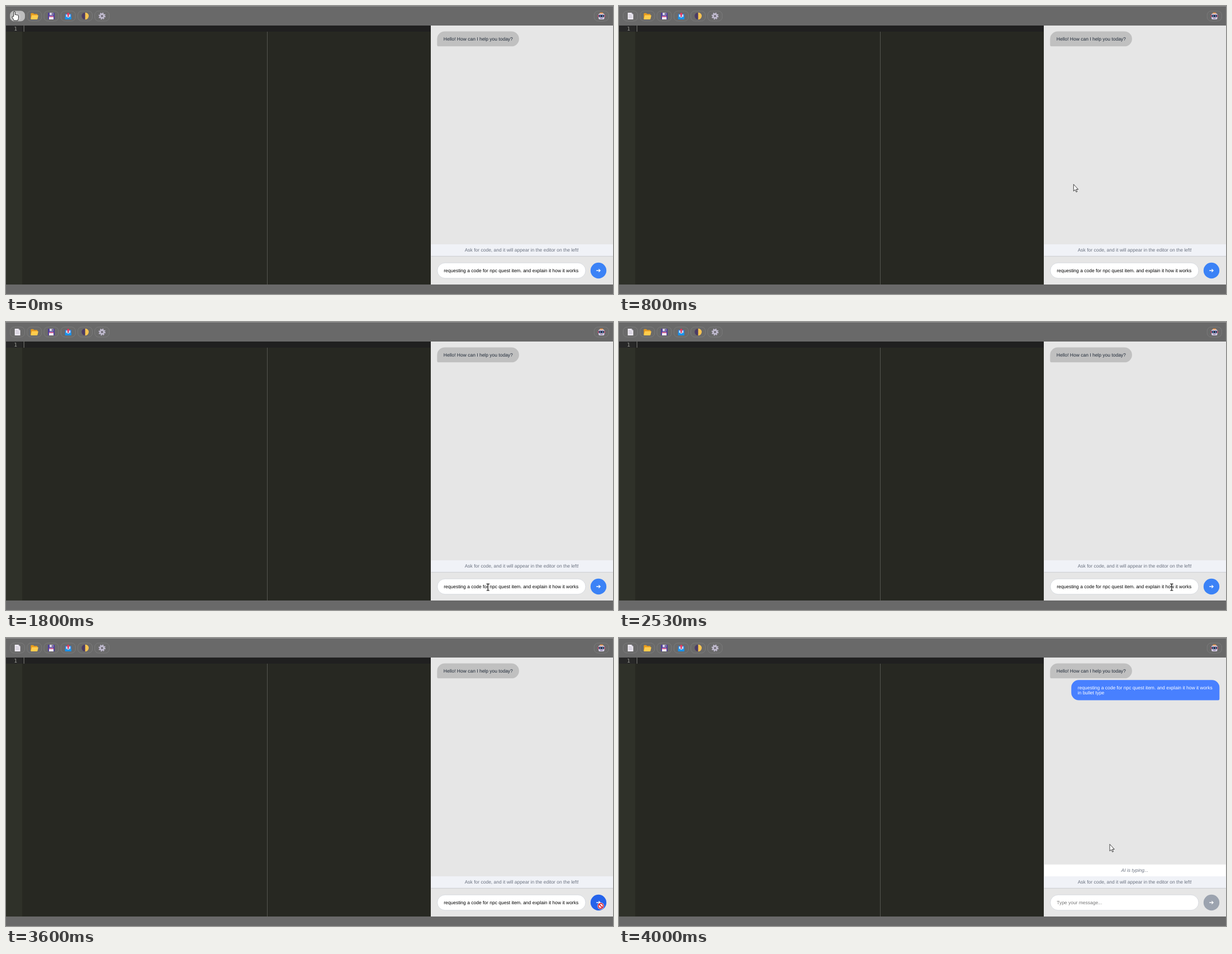
Recreate the animation shown at these times as an HTML page. Size 1086 px wide and 516 px high, loop 8000 ms.

```html
<!DOCTYPE html>
<html lang="en">
<head>
<meta charset="utf-8">
<title>Code editor with chat</title>
<style>
html, body { margin: 0; width: 100%; height: 100%; overflow: hidden; background: #696969; }
svg { display: block; width: 100vw; height: 100vh; }
text { font: 8.49px "Liberation Sans", Arial, sans-serif; text-rendering: geometricPrecision; }
.mid { text-anchor: middle; fill: #6b7280; }
.tool { fill: #6a6a6a; stroke: #7f7f7f; stroke-width: .8; }
</style>
</head>
<body>
<svg viewBox="0 0 1086 516">
  <rect width="1086" height="516" fill="#696969"/>
  <rect width="1086" height="1" fill="#8e8e8e"/>

  <!-- toolbar -->
  <g id="tools"></g>
  <g id="pageIcon" transform="translate(20.5 18)">
    <path d="M-4.8-6H2L5-3V6H-4.8Z" fill="#f1eef5"/>
    <path d="M2-6V-3H5Z" fill="#b9b3c6"/>
    <path d="M-3-3H.5M-3-1H3M-3 1H3M-3 3H3" stroke="#b5afc2" stroke-width=".8"/>
  </g>
  <g transform="translate(50.8 18)">
    <path d="M-6.5-4.3Q-6.5-5.3-5.5-5.3H-2L-.5-3.7H4.5Q5.5-3.7 5.5-2.7V5H-6.5Z" fill="#e79a1c"/>
    <path d="M-4.5-1.4H6.2Q7.2-1.4 6.9-.4L5.5 5Q5.3 6 4.3 6H-5.5Q-6.7 6-6.5 4.8Z" fill="#ffcc4d"/>
  </g>
  <g transform="translate(81 18)">
    <path d="M-6-5Q-6-6-5-6H5L6-5V5Q6 6 5 6H-5Q-6 6-6 5Z" fill="#50409a"/>
    <rect x="-3" y="-6" width="6.4" height="4.6" fill="#d5d0e4"/>
    <rect x="1" y="-5.4" width="1.5" height="3.3" fill="#433b6b"/>
    <rect x="-4" y=".4" width="8" height="5.6" fill="#f3eef8"/>
    <rect x="-4" y=".4" width="8" height="1.4" fill="#e54a7b"/>
  </g>
  <g transform="translate(111.3 18)">
    <rect x="-5.6" y="-4" width="11.2" height="10" rx="1.2" fill="#2a7bd6"/>
    <rect x="-4" y="-2.8" width="8" height="5.6" fill="#bfe2fb"/>
    <path d="M-5.6 1.6H-2L-1 3.2H1L2 1.6H5.6V6H-5.6Z" fill="#1792ec"/>
    <path d="M0-6.4L3.2-2.8H1.2V1.4H-1.2V-2.8H-3.2Z" fill="#e8365c"/>
  </g>
  <g transform="translate(141.6 18)">
    <circle r="6.2" fill="#4b3c66"/>
    <path d="M0-6.2A6.2 6.2 0 0 1 0 6.2Q2-0 0-6.2Z" fill="#fcc95a"/>
    <path d="M0-6.2A6.2 6.2 0 0 1 0 6.2Z" fill="#f6c451"/>
  </g>
  <g transform="translate(171.8 18)">
    <circle r="5.3" fill="none" stroke="#c3bdd2" stroke-width="2" stroke-dasharray="2.08 2.08"/>
    <circle r="3.4" fill="none" stroke="#c3bdd2" stroke-width="2.6"/>
    <circle r="1.6" fill="#77717f"/>
  </g>
  <g transform="translate(1065.3 18)">
    <rect x="-3" y="-6.2" width="6" height="3" rx="1" fill="#f1933c"/>
    <rect x="-6.3" y="-2" width="12.6" height="4" rx="1" fill="#e5446d"/>
    <rect x="-5.2" y="-4.4" width="10.4" height="10.4" rx="2" fill="#d8d0e6"/>
    <rect x="-5" y="-2.2" width="10" height="4.2" rx="1.4" fill="#2d2548"/>
    <circle cx="-2.3" r="1.1" fill="#63d4f5"/>
    <circle cx="2.3" r="1.1" fill="#63d4f5"/>
    <rect x="-2.4" y="3.4" width="4.8" height="1.1" fill="#6b5a8e"/>
  </g>

  <!-- editor -->
  <rect y="35" width="760" height="464" fill="#272822"/>
  <rect y="35" width="29" height="464" fill="#2f3129"/>
  <rect y="35" width="29" height="11" fill="#272727"/>
  <rect x="29" y="35" width="731" height="11" fill="#202020"/>
  <rect x="467" y="46" width="1" height="453" fill="#555651"/>
  <rect x="31.6" y="35" width="1" height="11" fill="#85857f"/>
  <text x="14.3" y="44" fill="#9c9d97" style="font:9.4px 'DejaVu Sans Mono',monospace">1</text>

  <!-- chat -->
  <rect x="760" y="35" width="326" height="464" fill="#e6e6e6"/>
  <path d="M785 45.5H904.5a13.4 13.4 0 0 1 0 26.8H773.5a2.2 2.2 0 0 1-2.2-2.2V59.2A13.6 13.6 0 0 1 785 45.5Z" fill="#c0c0c0"/>
  <text x="782.8" y="62" fill="#1f2937">Hello! How can I help you today?</text>
  <g id="sent">
    <path d="M822.5 75.3H1061a13.3 13.3 0 0 1 13.3 13.3V109.2a2.2 2.2 0 0 1-2.2 2.2H822.5a13.3 13.3 0 0 1-13.3-13.3V88.6A13.3 13.3 0 0 1 822.5 75.3Z" fill="#4880ff"/>
    <text x="820.7" y="91.7" fill="#fff">requesting a code for npc quest item. and explain it how it works</text>
    <text x="820.7" y="101.3" fill="#fff">in bullet type</text>
    <rect x="761" y="405.8" width="324.5" height="21.2" fill="#fff"/>
    <text class="mid" x="922.8" y="419.3" font-style="italic" style="font-style:italic">AI is typing...</text>
  </g>
  <rect x="760.5" y="427" width="325.5" height="21" fill="#f0f2f7"/>
  <rect x="760.5" y="447.8" width="325.5" height="1" fill="#cbcdd1"/>
  <text class="mid" x="922.8" y="440.2">Ask for code, and it will appear in the editor on the left!</text>
  <rect x="771.7" y="460.2" width="265.3" height="27.6" rx="13.8" fill="#fff" stroke="#d1d5db" stroke-width=".8"/>
  <text id="field" x="783.2" y="477.1"></text>
  <circle id="send" cx="1060" cy="474" r="14.2"/>
  <path d="M1056.2 474H1062.6M1060.4 471.4L1063.1 474L1060.4 476.6" fill="none" stroke="#fff" stroke-width="1.3"/>

  <!-- pointers, each with its hot spot at 0,0 -->
  <g id="pointer">
    <path data-kind="arrow" d="M0 0V12.2L2.8 9.6L4.7 13.8L6.5 13L4.7 9H8.3Z" fill="#fff" stroke="#111" stroke-width=".8"/>
    <path data-kind="hand" d="M-1.3 9V1.2a1.3 1.3 0 0 1 2.6 0V6a1.2 1.2 0 0 1 2.2.4a1.2 1.2 0 0 1 2.1.5a1.1 1.1 0 0 1 1.9.8V12L6 16.3H-.6L-4 10.4q-.3-1.6 1.2-1.5Z" fill="#fff" stroke="#111" stroke-width=".9"/>
    <g data-kind="beam" fill="none">
      <path d="M-2.6-5.6H-.6L0-5L.6-5.6H2.6M0-5V5.4M-2.6 6H-.6L0 5.4L.6 6H2.6" stroke="#fff" stroke-width="2" opacity=".5"/>
      <path d="M-2.6-5.6H-.6L0-5L.6-5.6H2.6M0-5V5.4M-2.6 6H-.6L0 5.4L.6 6H2.6" stroke="#000" stroke-width="1.1"/>
    </g>
    <g data-kind="ban">
      <circle r="5.9" fill="#fff"/>
      <circle r="4.5" fill="#fff" stroke="#d8202f" stroke-width="1.8"/>
      <path d="M-3.2-3.2L3.2 3.2" stroke="#d8202f" stroke-width="1.8"/>
    </g>
  </g>
</svg>
<script>
const LOOP = 8000, STEP = 200 / 3;
const $ = id => document.getElementById(id);
const DRAFT = "requesting a code for npc quest item. and explain it how it works";

// pointer path: step, x, y
const PATH = [
  [0, 15, 9.8], [1, 15.5, 9.8], [2, 15, 10], [3, 15, 10], [5, 60, 28], [8, 350, 140],
  [10, 620, 245], [12, 813.3, 319.5], [15, 900, 359.5], [16, 900, 359.5],
  [20, 893, 400], [24, 870, 462], [27, 862.3, 475], [30, 862.3, 475],
  [34, 905, 476], [38, 988.8, 475], [41, 1052, 477], [43, 1078, 481],
  [46, 1080, 481], [48, 1080, 481], [49, 1080.8, 480.4], [51, 1070, 480], [54, 1064, 480],
  [55, 1050, 469], [57, 975, 425], [60, 878, 369.5]
];

const BLUE = [59, 130, 246], DEEP = [37, 99, 235], GREY = [156, 163, 175];
const ramp = (t, a, b) => Math.min(1, Math.max(0, (t - a) / (b - a)));
const mix = (a, b, u) => a.map((v, i) => v + (b[i] - v) * u);
const rgb = c => `rgb(${c.map(Math.round)})`;

const toolXs = [0, 1, 2, 3, 4, 5].map(i => 20.5 + 30.25 * i).concat(1065.3);
$("tools").innerHTML = toolXs.map(x =>
  `<rect class="tool" x="${x - 13}" y="9" width="26" height="18" rx="7"/>`).join("");
const newButton = $("tools").firstChild;

function pointerAt(k) {
  const i = PATH.findIndex(p => p[0] > k);
  if (i < 0) return PATH[PATH.length - 1].slice(1);
  const a = PATH[i - 1], b = PATH[i];
  return mix(a, b, (k - a[0]) / (b[0] - a[0])).slice(1);
}

function pointerKind(x, y, k) {
  const inside = (l, t, r, b) => x > l && x < r && y > t && y < b;
  if (Math.hypot(x - 1060, y - 474) < 14.5) return k >= 54 ? "ban" : "hand";
  if (inside(7, 8, 34, 28)) return "hand";
  if (inside(29, 35, 760, 499) || inside(772, 460, 1037, 488) || inside(820, 432, 1025, 443)) return "beam";
  return "arrow";
}

function draw(time) {
  const k = Math.min(60, Math.floor((time + 4) / STEP));
  const t = k * STEP;

  const [x, y] = pointerAt(k);
  const kind = pointerKind(x, y, k);
  $("pointer").setAttribute("transform", `translate(${x} ${y})`);
  for (const el of $("pointer").children)
    el.style.display = el.dataset.kind === kind ? "" : "none";

  const lit = 1 - ramp(t, 200, 400);
  newButton.style.fill = rgb(mix([106, 106, 106], [190, 190, 190], lit));
  newButton.style.stroke = rgb(mix([127, 127, 127], [190, 190, 190], lit));
  $("pageIcon").style.opacity = 1 - .7 * lit;

  const hover = ramp(t, 2670, 2820) - ramp(t, 2870, 3060) + ramp(t, 3300, 3460);
  $("send").style.fill = rgb(mix(mix(BLUE, DEEP, hover), GREY, ramp(t, 3600, 3800)));

  const sent = k >= 55;
  $("sent").style.display = sent ? "" : "none";
  $("field").textContent = sent ? "Type your message..." : DRAFT;
  $("field").style.fill = sent ? "#757575" : "#000";
}

const start = performance.now();
function tick() {
  draw((performance.now() - start) % LOOP);
  requestAnimationFrame(tick);
}
tick();
</script>
</body>
</html>
```
